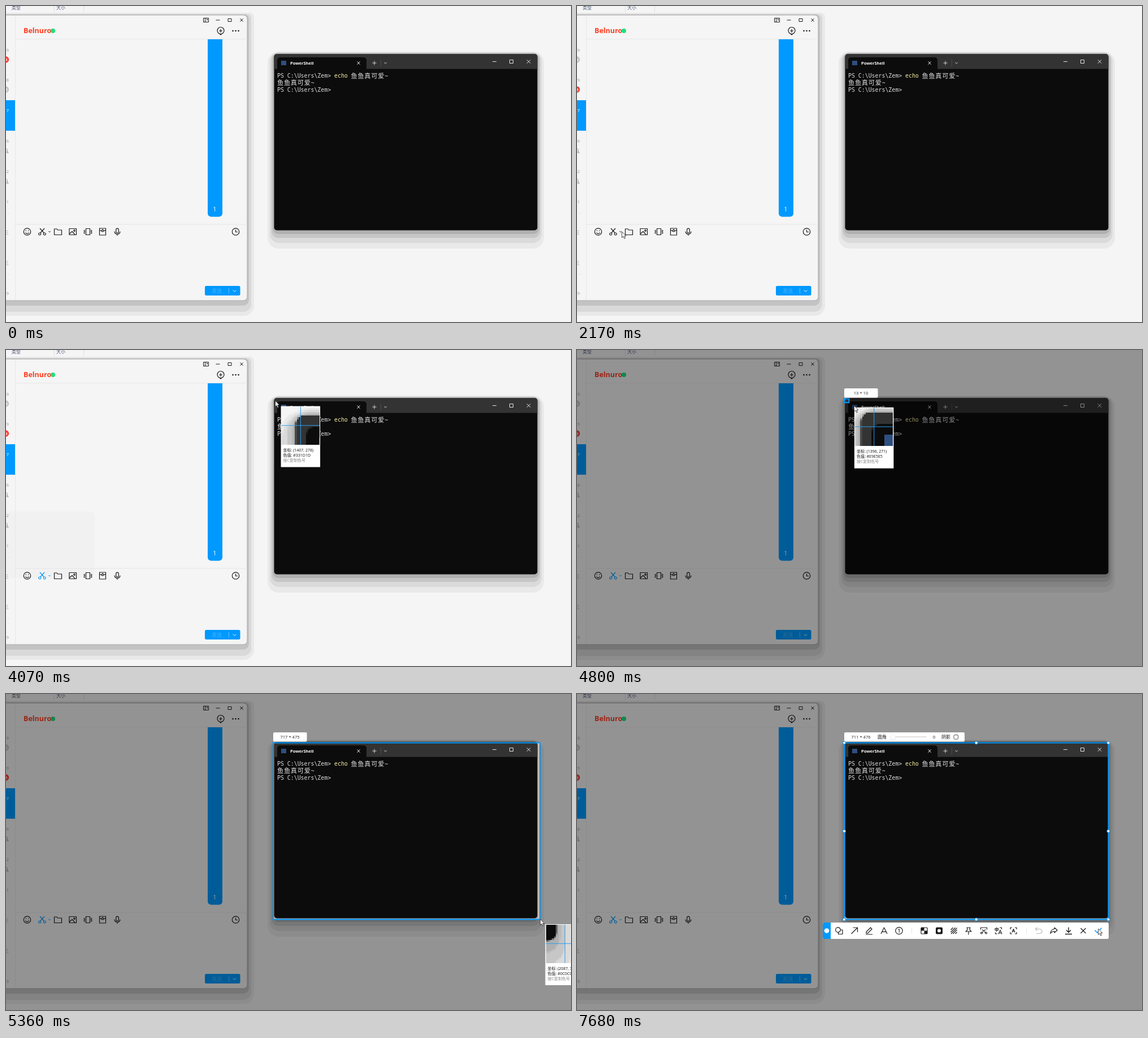
An HTML page with a canvas that plays this animation: 1000x560 px, repeating every 8000 ms.

```html
<!DOCTYPE html>
<html lang="zh">
<head>
<meta charset="utf-8">
<style>
html, body { margin: 0; width: 100%; height: 100%; overflow: hidden; background: #f5f5f5; }
canvas { display: block; }
</style>
</head>
<body>
<canvas id="stage" width="1000" height="560"></canvas>
<script>
const W = 1000, H = 560, LOOP = 8000;
const BLUE = '#0099ff', INK = '#1a1a1a', BG = '#f5f5f5';
const UI = '"Open Sans", "Noto Sans CJK SC", "Noto Sans CJK", sans-serif';
const MONO = '"DejaVu Sans Mono", "Noto Sans CJK SC", "Noto Sans CJK", monospace';
const out = document.getElementById('stage').getContext('2d');
const sceneCanvas = document.createElement('canvas');
sceneCanvas.width = W;
sceneCanvas.height = H;
const scene = sceneCanvas.getContext('2d');
let c = scene;

// Pointer path: time, x, y
const PATH = [
  [370, -9, 210], [600, 60, 262], [800, 165, 345], [950, 225, 382], [1170, 341, 463],
  [1210, 341, 463], [1400, 389, 424], [1600, 270, 395], [1800, 150, 392], [2010, 79, 400],
  [2200, 79, 400], [2450, 65, 395], [3270, 65, 395], [3310, 100, 391], [3360, 172, 376],
  [3390, 267, 357], [3430, 325, 341], [3520, 435, 322], [3700, 470, 230], [3880, 486, 130],
  [4000, 480, 92], [4070, 476, 90], [4110, 476, 90], [4470, 473, 87], [4760, 473, 87],
  [4800, 489, 98], [4900, 580, 160], [5100, 800, 310], [5240, 905, 378], [5290, 928, 390],
  [5340, 945, 399], [5560, 945, 399], [5640, 941, 400], [5930, 941, 400], [6250, 951, 470],
  [6730, 927, 418], [6890, 926, 417], [7390, 926, 417], [7430, 922, 416]
];

function pos(t) {
  let i = 0;
  while (i < PATH.length - 1 && PATH[i + 1][0] <= t) i++;
  const a = PATH[i], b = PATH[i + 1];
  if (!b || t <= a[0]) return [a[1], a[2]];
  const k = (t - a[0]) / (b[0] - a[0]);
  return [a[1] + (b[1] - a[1]) * k, a[2] + (b[2] - a[2]) * k];
}

function box(x, y, w, h, fill, r = 0) {
  c.beginPath();
  c.roundRect(x, y, w, h, r);
  c.fillStyle = fill;
  c.fill();
}

function frame(x, y, w, h, color, lw = 1, r = 0) {
  c.beginPath();
  c.roundRect(x, y, w, h, r);
  c.strokeStyle = color;
  c.lineWidth = lw;
  c.stroke();
}

function dot(x, y, r, fill) {
  c.beginPath();
  c.arc(x, y, r, 0, 7);
  c.fillStyle = fill;
  c.fill();
}

function text(s, x, y, size, color, { weight = 400, align = 'left', font = UI } = {}) {
  c.font = `${weight} ${size}px ${font}`;
  c.textAlign = align;
  c.fillStyle = color;
  c.fillText(s, x, y);
}

// Stroked icon centred on x, y
function icon(d, x, y, color = INK, lw = 1.2) {
  c.save();
  c.translate(x, y);
  c.strokeStyle = color;
  c.lineWidth = lw;
  c.lineJoin = 'round';
  c.stroke(new Path2D(d));
  c.restore();
}

const ring = (r, x = 0, y = 0) => `M${x + r} ${y}a${r} ${r} 0 1 1 ${-2 * r} 0a${r} ${r} 0 1 1 ${2 * r} 0`;
const cross = r => `M${-r} ${-r}L${r} ${r}M${r} ${-r}L${-r} ${r}`;
const chevron = r => `M${-r} ${-r / 2}L0 ${r / 2}L${r} ${-r / 2}`;
const SCISSORS = 'M-4-6L3.5 2.5M4-6L-3.5 2.5' + ring(2, -4.3, 4) + ring(2, 4.3, 4);

function drawBackdrop() {
  box(0, 0, W, H, BG);
  text('类型', 10, 6, 8, '#44546f');
  text('大小', 89, 6, 8, '#44546f');
  box(85, 0, 1, 11, '#dddddd');
  box(137, 0, 1, 11, '#dddddd');
}

function drawList(t) {
  const gray = '#999999', swapped = t >= 1000;
  const label = (s, y, color = gray) => text(s, 5, y + 3, 8, color, { align: 'right' });
  box(0, 167, 16.5, 54, BLUE);
  label('9', 78);
  label(swapped ? '9' : '8', 131);
  label('7', 185, '#ffffff');
  label('06', 239);
  label('42', 293);
  label('01', 347);
  label('.', 365);
  label('三', 401);
  label('三', 455);
  label('.', 473);
  label('9', 509);
  [95, 148].forEach((y, i) => {
    dot(-0.5, y, 5.7, swapped === (i === 1) ? '#ff3b30' : '#c4c4c4');
    text('9', 2.5, y + 3, 7, '#ffffff', { align: 'right', weight: 600 });
  });
  for (const y of [257, 311]) icon('M-5 3H3.5L2 1V-1.500A2.500 2.500 0 0 0-3-1.500M-4-4L4 4', 0.5, y, gray, 0.9);
}

function drawChat(t) {
  box(-30, 12, 469, 537, '#e9e9e9', [0, 8, 18, 0]);
  box(-30, 14, 464, 528, '#d9d9d9', [0, 8, 14, 0]);
  box(-30, 15, 460, 516, '#c3c3c3', [0, 8, 10, 0]);
  box(-30, 15.5, 457.5, 507, '#a9a9a9', [0, 7, 7, 0]);
  box(-30, 16.5, 456.5, 505, BG, [0, 6, 6, 0]);
  if (t >= 2450 && t < 4760) box(-20, 286, 177, 118, '#f1f1f1', 10);
  drawList(t);
  box(16, 17, 1, 504, '#e8e8e8');
  box(17, 58, 410, 1, '#e8e8e8');
  box(17, 386.500, 410, 1, '#e6e6e6');

  text('Belnuro', 31, 48, 12.5, '#ff3b1f', { weight: 700 });
  dot(83, 44, 4, '#22e07c');
  icon('M-4.500-3.500H4.500V3.500H-4.500ZM-1.500-3.500V3.500M1 0H3M1-1.500H3', 354, 25, INK, 1);
  icon('M-3.500 0H3.500', 375, 25, INK, 1);
  icon('M-3-2.500H3V2.500H-3Z', 396, 25, INK, 1);
  icon(cross(2.7), 417, 25, INK, 1);
  icon(ring(6, 0, -0.5) + 'M-3 0H3M0-3V3M-2 5L0 7L2 5', 380, 44);
  for (const x of [401.5, 406.5, 411.5]) dot(x, 44, 1.3, INK);

  box(357, 59, 26, 314.500, BLUE, [0, 0, 6, 6]);
  text('1', 369.500, 364, 11, '#ffffff', { align: 'center' });

  const active = t >= 2300 ? BLUE : INK;
  icon(ring(6.2) + 'M-3 1.500A3.200 3.200 0 0 0 3 1.500M-2.200-2.500V-1M2.200-2.500V-1', 37.500, 400);
  icon(SCISSORS, 64, 400, active);
  icon(chevron(1.8), 77, 400, active, 1);
  icon('M-6.500-5H-2L-0.500-3H6.500V5.500H-6.500Z', 92, 400);
  icon('M-6-5.500H6.500V5.500H-6ZM-6 4L-1-0.500L4 5' + ring(1.3, 3, -2), 118, 400);
  icon('M-3.500-5.500H3.500V5.500H-3.500ZM-5.500-3L-7-1.500L-5.500 0L-7 2L-5.500 3.500M5.500-3L7-1.500L5.500 0L7 2L5.500 3.500', 145, 400);
  icon('M-5.500-6H5.500V6H-5.500ZM-5.500-3L0 0L5.500-3M-2-2L0-4L2-2', 171, 400);
  icon('M-2.300-3.500a2.300 2.300 0 0 1 4.600 0V0a2.300 2.300 0 0 1-4.600 0ZM-5-0.500A5 5 0 0 0 5-0.500M0 4.500V7', 197, 400);
  icon(ring(6.2) + 'M0-3.500V0.500H3.500', 406.500, 400);

  box(352, 496, 62.500, 17, BLUE, 2.5);
  text('发送', 364, 508, 9, '#45b4ff');
  box(394, 500, 1, 9, '#66c2ff');
  icon(chevron(2.7), 404.500, 505, '#ffffff', 1);
}

function drawTerminal() {
  box(463, 81, 489, 349, '#e9e9e9', 20);
  box(467, 82, 481, 338, '#dadada', 16);
  box(470, 83, 475, 328, '#c6c6c6', 12);
  box(472.500, 84, 470, 320, '#b0b0b0', 9);
  box(474.500, 85, 466, 312.500, '#0c0c0c', 5);
  box(474.500, 85, 466, 26.500, '#333333', [5, 5, 0, 0]);
  box(480, 91, 158, 21, '#0c0c0c', [5, 5, 0, 0]);
  box(487, 97, 9, 8, '#2f4f80');
  const light = '#e6e6e6';
  text('PowerShell', 503, 104, 7.5, '#ffffff', { weight: 700 });
  icon(cross(2.7), 624, 101, light, 1);
  icon('M-3.500 0H3.500M0-3.500V3.500', 652, 101, light, 0.9);
  box(663, 95, 1, 12, '#505050');
  icon(chevron(2.3), 671.500, 101, light, 0.9);
  icon('M-3.500 0H3.500', 864.500, 98.500, light, 1);
  icon('M-3-3H3V3H-3Z', 894.500, 98.500, light, 1);
  icon(cross(3.2), 925, 98.500, light, 1);

  const mono = { font: MONO }, fg = '#dddddd', prompt = 'PS C:\\Users\\Zem>';
  const phrase = (x, y) => {
    [...'鱼鱼真可爱'].forEach((ch, i) => text(ch, x + i * 11.93, y, 11.2, fg, mono));
    text('~', x + 59.700, y, 9.9, fg, mono);
  };
  text(prompt, 480, 127, 9.9, fg, mono);
  text('echo', 581, 127, 9.9, '#f9f1a5', mono);
  phrase(610.500, 127.500);
  phrase(480, 140);
  text(prompt, 480, 152, 9.9, fg, mono);
}

function pixelColor(t) {
  if (t < 3900) return '#F2F2F2';
  if (t < 4760) return '#331D1D';
  return t < 4900 ? '#E9E5E5' : '#0C0C0C';
}

function drawLoupe(t) {
  const [px, py] = pos(t - 20), [lx, ly] = pos(t - 70);
  const x = px + 9.5, y = py + 9, n = 20.6;
  box(x, y, 69.500, 108, '#ffffff');
  c.imageSmoothingEnabled = false;
  box(x + 1, y + 1, 67.500, 67.500, BG);
  c.drawImage(sceneCanvas, px - n / 2, py - n / 2, n, n, x + 1, y + 1, 67.500, 67.500);
  box(x + 34.300, y + 1, 1, 67.500, '#2a9df0');
  box(x + 1, y + 33.700, 67.500, 1, '#2a9df0');
  const X = Math.round(1396 + (lx - 473) / 0.6585);
  const Y = Math.round(269 + (ly - 86) / 0.6585);
  text(`坐标: (${X}, ${Y})`, x + 4, y + 80.500, 7, '#111111');
  text('色值: ' + pixelColor(t), x + 4, y + 89.500, 7, '#111111');
  text('按C复制色号', x + 4, y + 98.700, 7, '#888888');
}

function drawSelection(t) {
  const done = t >= 5600, bar = t >= 5930;
  const [px, py] = pos(t - 20);
  const x = 473, y = 86;
  const w = done ? 467.500 : Math.max(2, px - x), h = done ? 313 : Math.max(2, py - y);
  c.fillStyle = 'rgba(0,0,0,0.4)';
  c.beginPath();
  c.rect(0, 0, W, H);
  c.rect(x, y, w, h);
  c.fill('evenodd');
  frame(x, y + 0.5, w, h, BLUE, 2);

  const size = done ? '711 * 476' : `${Math.round(w / 0.6585)} * ${Math.round(h / 0.6585)}`;
  box(473, 68, bar ? 213 : 59.500, 16.500, '#ffffff', 2);
  text(size, 502.500, 79, 7.6, '#222222', { align: 'center' });
  if (!bar) return;

  text('圆角', 532, 79, 8, INK);
  box(562, 75, 57, 2, '#e0e0e0', 1);
  dot(559, 76.500, 5, '#dcdcdc');
  dot(559, 76.200, 4.4, '#ffffff');
  text('0', 632, 79, 7.6, INK, { align: 'center' });
  text('阴影', 645, 79, 8, INK);
  frame(667, 72.500, 7.500, 7.500, '#555555', 1, 1.5);
  for (const hx of [0, 0.5, 1]) for (const hy of [0, 0.5, 1]) {
    if (hx === 0.5 && hy === 0.5) continue;
    dot(x + w * hx, y + 0.5 + h * hy, 3, BLUE);
    dot(x + w * hx, y + 0.5 + h * hy, 2, '#ffffff');
  }
  drawTools();
}

function drawTools() {
  const y = 419.500;
  box(435, 405, 506, 29, '#ffffff', 2.5);
  box(435, 405, 14, 29, BLUE, [2.5, 0, 0, 2.5]);
  dot(442, y, 4.3, '#ffffff');
  icon(ring(4.3, -2, -1.5) + 'M3-1.500H6V6H-1.500V3', 464, y);
  icon('M-5.500 5.500L5.500-5.500M-2.500-5.500H5.500V2.500', 491, y);
  icon('M-5 2L2.500-5.500L5-3L-2.500 4.500H-5ZM-6 6.500H6', 517, y);
  icon('M-5.500 5.500L0-5.500L5.500 5.500M-3.500 1.800H3.500', 543.500, y);
  icon(ring(6.2), 570, y);
  text('1', 570, y + 3, 8.5, INK, { align: 'center', weight: 600 });
  box(592, 414, 1, 11, '#e5e5e5');
  frame(609, y - 5.500, 11, 11, INK, 1.2, 1);
  box(609, y - 5.500, 5.500, 5.500, INK);
  box(614.500, y, 5.500, 5.500, INK);
  box(635, y - 6, 12, 12, INK, 2);
  dot(641, y, 3, '#ffffff');
  icon('M-5.500-1.500L-1.500-5.500M-5.500 2.500L2.500-5.500M-5 5.500L5.500-5M-1.500 5.500L5.500-1.500M2.500 5.500L5.500 2.500', 667, y);
  icon('M-3.500-5.500H3.500M-2.300-5.500V-1L-5 1.500H5L2.300-1V-5.500M0 1.500V7', 693, y);
  icon('M-5.500-2V-5.500H5.500V-2M-3-2L3 3M3-2L-3 3' + ring(1.5, -4, 4) + ring(1.5, 4, 4), 720, y);
  icon('M-6-4H-0.500V-1H-6ZM-3.200-6V2M2-5.500H5.500V-2.500M-5.500 3V5.500H-2M0 6L3 -1L6 6M1 4H5', 746, y, INK, 1.1);
  icon('M-5.500-2.500V-5.500H-2.500M2.500-5.500H5.500V-2.500M5.500 2.500V5.500H2.500M-2.500 5.500H-5.500V2.500M-2.500 3L0-3L2.500 3M-1.500 1H1.500', 772.500, y);
  box(795, 414, 1, 11, '#e5e5e5');
  icon('M-2.500-6L-5.500-3L-2.500 0M-5.500-3H2A4 4 0 0 1 2 5H-4', 817, y, '#b8b8b8');
  icon('M1-5.500L6-1L1 3.500V1C-2 1-4 2-6 5C-5.500 0-3-3 1-3Z', 844, y);
  icon('M0-6V3M-4-1L0 3L4-1M-6 6H6', 870, y, INK, 1.4);
  icon(cross(4.5), 896, y);
  icon('M-6-0.500L-2 4L6-4.500', 922.500, y - 0.5, BLUE, 1.4);
}

function drawPointer(t) {
  if (t < 370) return;
  const [x, y] = pos(t);
  c.save();
  c.translate(x + 0.5, y);
  const arrow = new Path2D('M0 0V10.500L2.500 8.200L4.200 12.200L6 11.400L4.300 7.600H7.500Z');
  c.fillStyle = '#ffffff';
  c.fill(arrow);
  c.strokeStyle = '#222222';
  c.lineWidth = 0.8;
  c.stroke(arrow);
  c.restore();
}

function render(t) {
  c = scene;
  drawBackdrop();
  drawChat(t);
  drawTerminal();
  c = out;
  c.drawImage(sceneCanvas, 0, 0);
  if (t >= 4760) drawSelection(t);
  if (t >= 2740 && t < 5930) drawLoupe(t);
  drawPointer(t);
}

const start = performance.now();
function tick() {
  render((performance.now() - start) % LOOP);
  requestAnimationFrame(tick);
}
tick();
</script>
</body>
</html>
```
